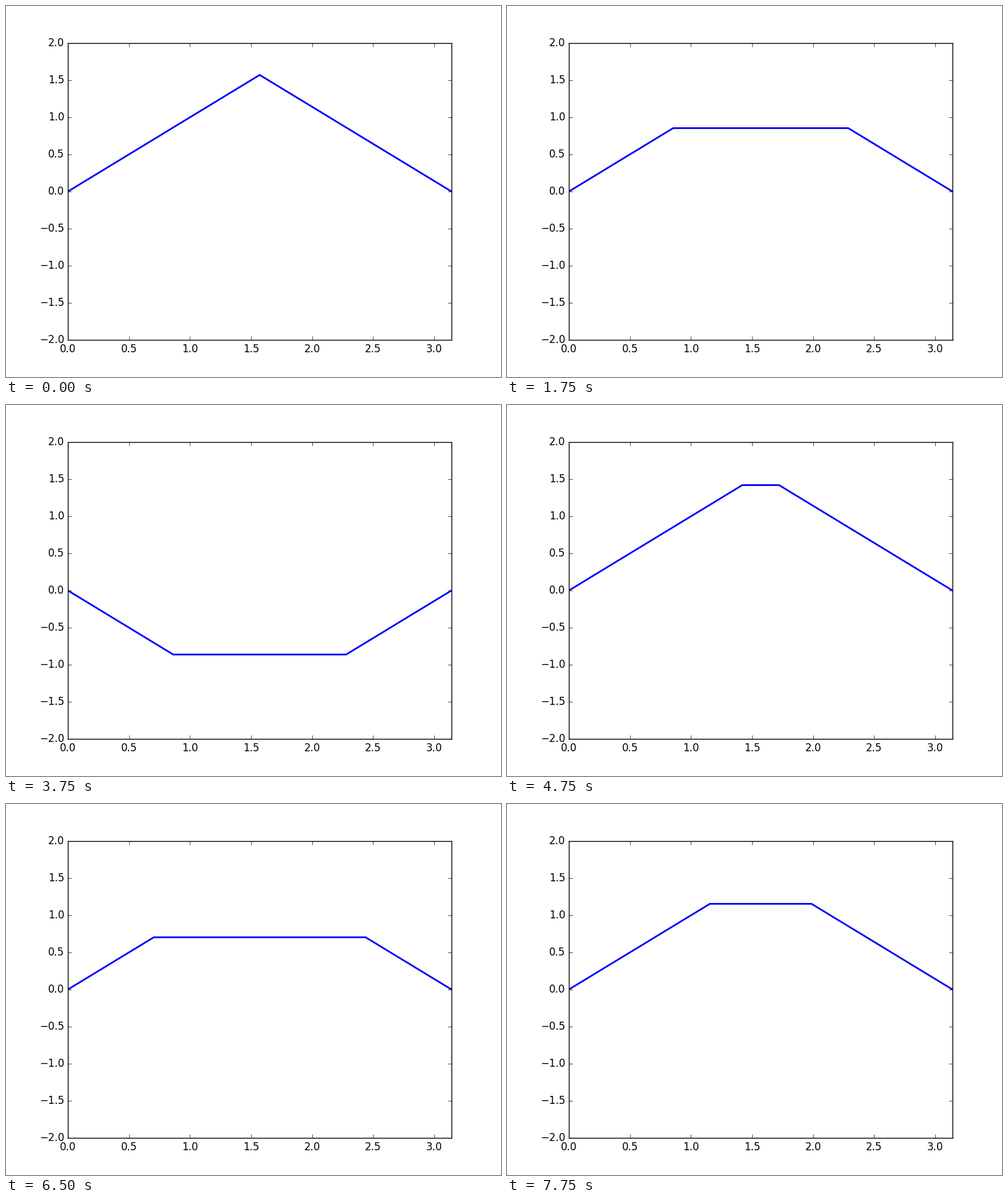
Animation of 800 by 600 pixels, one loop 8 s. Source, as a matplotlib script:

```python
import numpy as np
import matplotlib.pyplot as plt
from matplotlib.animation import FuncAnimation

FRAMES, INTERVAL = 32, 250

plt.style.use("classic")
plt.rcParams.update({
    "figure.dpi": 100,
    "savefig.dpi": 100,
    "figure.facecolor": "white",
    "font.family": "DejaVu Sans",
})

fig, ax = plt.subplots(figsize=(8, 6))
ax.set_xlim(0, np.pi)
ax.set_ylim(-2, 2)
line, = ax.plot([], [], color="blue", lw=2)


def string_shape(t):
    """Plucked string on [0, pi] at time t, with wave speed 1."""
    phase = t % (2 * np.pi)
    level = np.pi / 2 - min(phase, 2 * np.pi - phase)
    kink = abs(level)
    return [0, kink, np.pi - kink, np.pi], [0, level, level, 0]


def update(i):
    line.set_data(*string_shape(i))
    return line,


anim = FuncAnimation(fig, update, frames=FRAMES, interval=INTERVAL,
                     repeat=True, repeat_delay=0)
plt.show()
```
